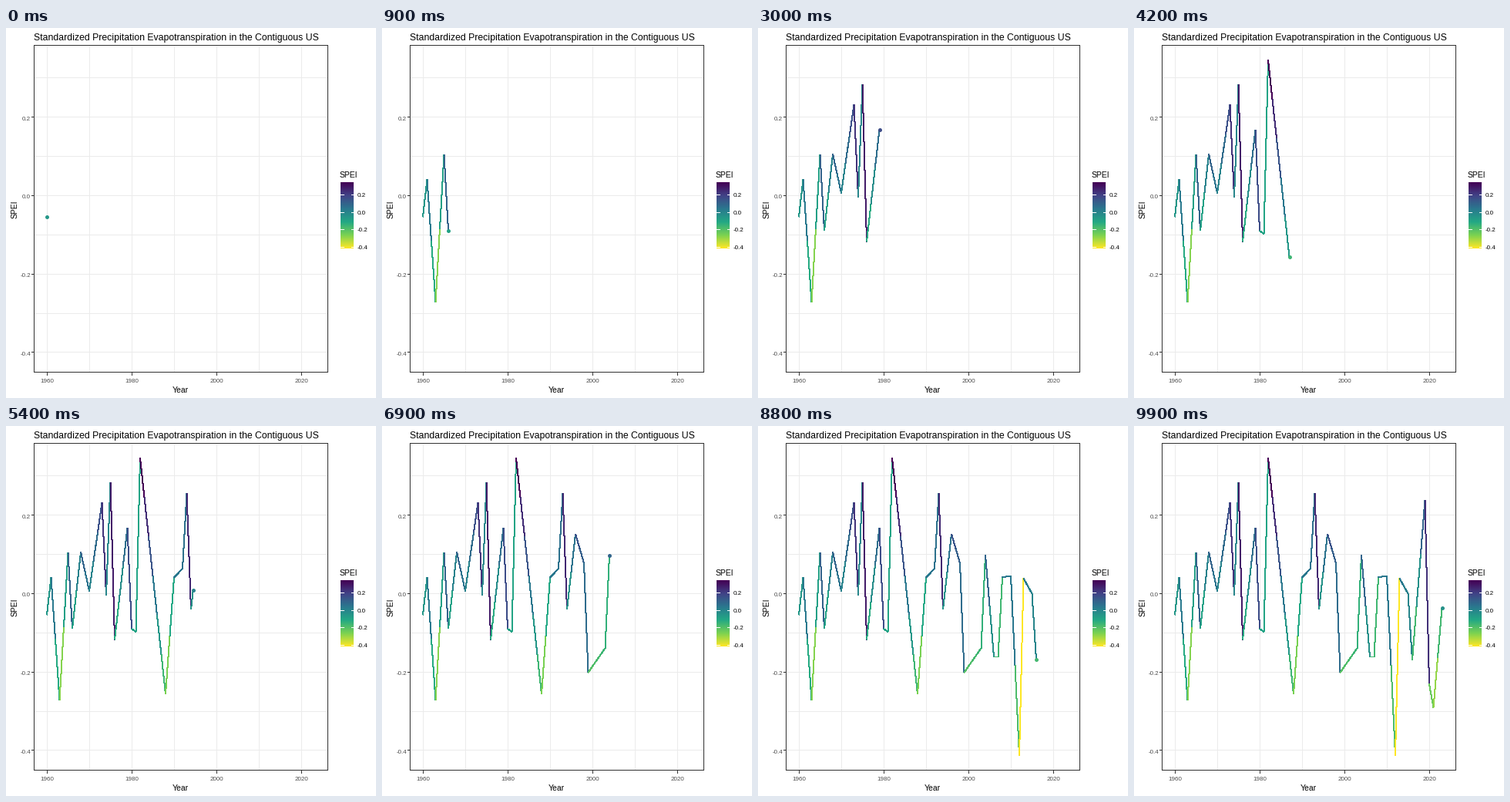
A matplotlib script that plays this animation: 480x480 px, repeating every 10000 ms.

```python
import matplotlib.pyplot as plt
import numpy as np
from matplotlib.animation import FuncAnimation
from matplotlib.collections import LineCollection
from matplotlib.colors import LinearSegmentedColormap
from matplotlib.patches import Rectangle

plt.rcParams["font.family"] = "Liberation Sans"

SIZE, DPI = 480, 72  # at 72 dpi one point is one pixel
FRAMES, INTERVAL = 100, 100

# turning points of the index; the years between lie on straight lines
TURNS = {1960: -.055, 1961: .04, 1963: -.273, 1965: .103, 1966: -.09,
         1968: .105, 1970: .006, 1973: .231, 1974: -.004, 1975: .283,
         1976: -.118, 1979: .167, 1980: -.091, 1981: -.098, 1982: .345,
         1988: -.257, 1990: .04, 1992: .063, 1993: .254, 1994: -.041,
         1996: .151, 1998: .077, 1999: -.202, 2003: -.14, 2004: .097,
         2006: -.162, 2007: -.162, 2008: .041, 2010: .044, 2012: -.413,
         2013: .038, 2015: -.001, 2016: -.17, 2019: .237, 2020: -.232,
         2021: -.291, 2023: -.038}
YEARS = np.arange(min(TURNS), max(TURNS) + 1)
SPEI = np.interp(YEARS, list(TURNS), list(TURNS.values()))
# each year lands on a whole step of the loop
STEPS = np.rint(np.linspace(0, FRAMES - 1, len(YEARS)))

LEFT, RIGHT, TOP, BOTTOM = 36, 417, 22, 446
BAR_X, BAR_Y, BAR_W, BAR_H = 434, 200, 17, 86
BREAKS = (-.4, -.2, 0, .2)
GRID, DARK, GREY = "#EBEBEB", "#333333", "#4D4D4D"

viridis = plt.get_cmap("viridis_r")
cmap = LinearSegmentedColormap.from_list("scale", viridis(np.linspace(0, 1, 6)))
norm = plt.Normalize(SPEI.min(), SPEI.max())


def px(year):
    return 53 + 5.5 * (year - 1960)


def py(value):
    return 217 - 508.5 * value


fig = plt.figure(figsize=(SIZE / DPI, SIZE / DPI), dpi=DPI, facecolor="white")
ax = fig.add_axes([0, 0, 1, 1])
ax.axis("off")


def rule(x0, y0, x1, y1, color, z=1):
    ax.plot([x0, x1], [y0, y1], color=color, lw=1, zorder=z,
            solid_capstyle="butt", antialiased=False)


def label(x, y, s, size, color="black", **kw):
    ax.text(x, y, s, fontsize=size, color=color, va="baseline", **kw)


def draw_panel():
    for year in range(1960, 2021, 10):
        rule(px(year), TOP, px(year), BOTTOM, GRID)
    for v in np.arange(-4, 4) / 10:
        rule(LEFT, py(v), RIGHT, py(v), GRID)
    for year in range(1960, 2021, 20):
        rule(px(year), BOTTOM, px(year), BOTTOM + 4, DARK)
        label(px(year) + .5, 460, str(year), 8, GREY, ha="center")
    for v in BREAKS:
        rule(LEFT - 3, py(v), LEFT, py(v), DARK)
        label(32, py(v) + 4.4, f"{v:.1f}", 8, GREY, ha="right")
    ax.add_patch(Rectangle((LEFT, TOP), RIGHT - LEFT, BOTTOM - TOP, fill=False,
                           ec=DARK, lw=1, zorder=5, antialiased=False))
    label(36, 16, "Standardized Precipitation Evapotranspiration "
                  "in the Contiguous US", 12.3)
    label(226.5, 473, "Year", 10.4, ha="center")
    label(14.5, 235, "SPEI", 10.4, ha="center", rotation=90,
          rotation_mode="anchor")


def draw_legend():
    label(433, 194, "SPEI", 10.4)
    ramp = np.linspace(1, 0, BAR_H)[:, None]
    ax.imshow(ramp, cmap=cmap, vmin=0, vmax=1, aspect="auto", zorder=2,
              extent=(BAR_X, BAR_X + BAR_W, BAR_Y + BAR_H, BAR_Y))
    for v in BREAKS:
        y = BAR_Y + BAR_H * (1 - norm(v)) - .6
        rule(BAR_X, y, BAR_X + 3.5, y, "white", 3)
        rule(BAR_X + BAR_W - 3.5, y, BAR_X + BAR_W, y, "white", 3)
        label(456, y + 3, f"{v:.1f}", 8)


draw_panel()
draw_legend()
ax.set_xlim(0, SIZE)
ax.set_ylim(SIZE, 0)

# unsmoothed strokes cover about one pixel more than their width
trail = LineCollection([], linewidths=1, capstyle="butt", zorder=3,
                       antialiaseds=False)
ax.add_collection(trail, autolim=False)
dot, = ax.plot([], [], "o", ms=5, mew=0, zorder=4)


def update(i):
    year, value = np.interp(i, STEPS, YEARS), np.interp(i, STEPS, SPEI)
    past = STEPS < i
    pts = np.column_stack([px(np.append(YEARS[past], year)),
                           py(np.append(SPEI[past], value))])
    trail.set_segments(list(np.stack([pts[:-1], pts[1:]], axis=1)))
    trail.set_color(cmap(norm(SPEI[past])))
    dot.set_data([px(year)], [py(value)])
    dot.set_color(cmap(norm(value)))
    return trail, dot


anim = FuncAnimation(fig, update, frames=FRAMES, interval=INTERVAL,
                     repeat=True, repeat_delay=0, blit=False)
plt.show()
```
